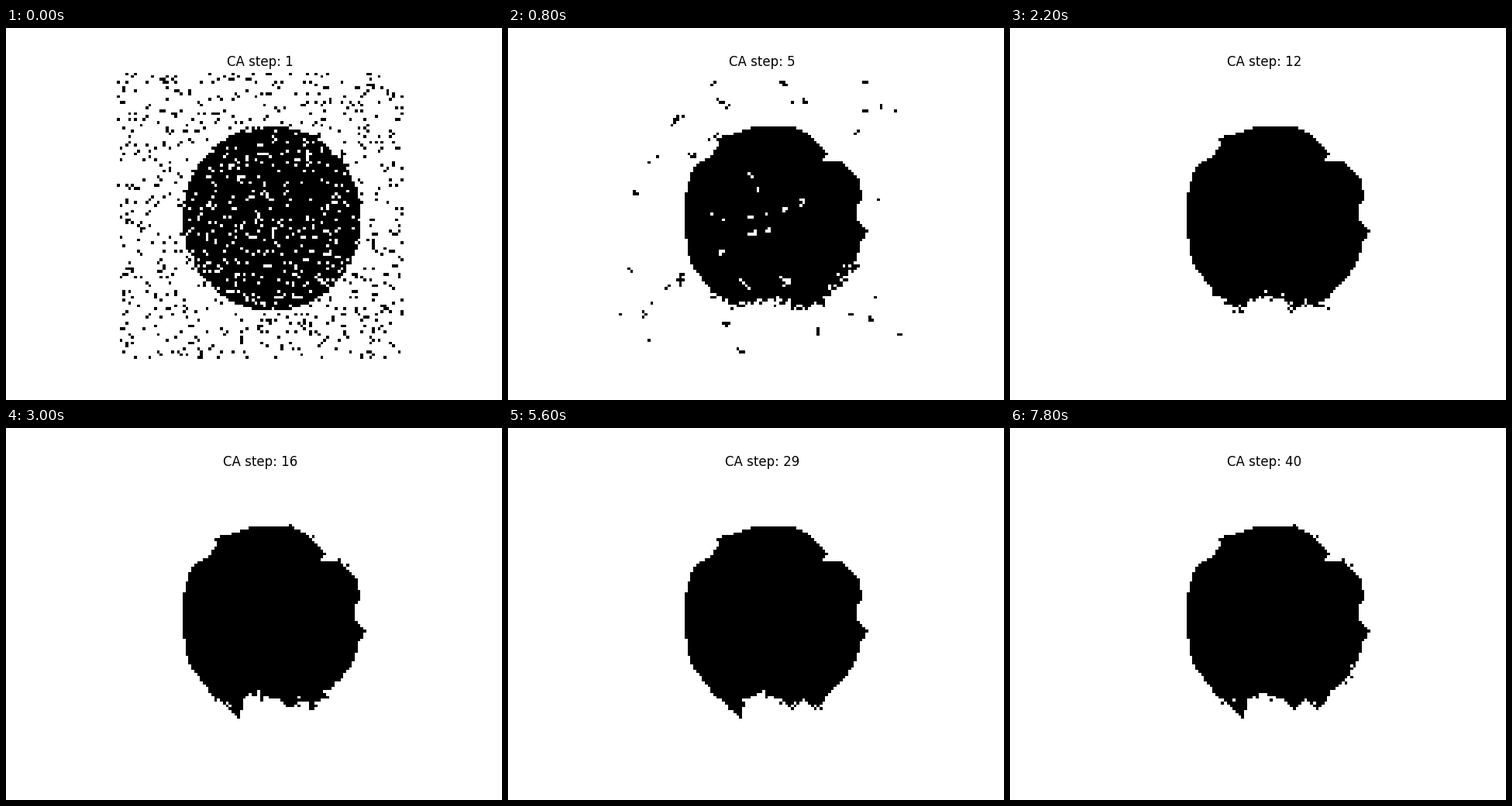
Animation, 640 px wide and 480 px high, one loop 8000 ms. Source, as a matplotlib script:

```python
import numpy as np
import matplotlib.pyplot as plt
from matplotlib.animation import FuncAnimation
from matplotlib.path import Path

SIZE, STEPS = 100, 40
row, col = np.mgrid[:SIZE, :SIZE]

# Corners of the settled blob as (column, row); its lower side is cut separately.
OUTLINE = [(47, 19), (61, 19), (66, 21.5), (73, 28), (71, 31), (78, 31), (84, 38),
           (85, 44), (82.5, 47), (83.5, 52), (87, 55.5), (84, 60), (83, 65),
           (80, 70), (73, 77), (70, 82), (70, 90), (42, 90), (42, 86), (38, 82),
           (32, 76), (26, 68), (24, 63), (23, 53), (22.5, 46), (25, 36), (28, 31),
           (32, 30), (35, 25), (34, 23), (40, 21.5)]

# Rows of the lower side at a few columns, before and after it wears into teeth.
KNOTS = [32, 38, 42, 44, 49, 56, 60, 64, 68, 70, 73]
SMOOTH = [77, 80, 81, 81, 80, 79, 82, 82, 81, 81, 77]
TEETH = [77, 82, 86, 79, 77, 79, 83, 79, 83, 81, 77]

BLINKERS = ([30, 32, 18, 22], [77, 80, 60, 68])


def box_mean(mask, reach):
    span = range(-reach, reach + 1)
    return np.mean([np.roll(mask, (dy, dx), (0, 1)) for dy in span for dx in span],
                   axis=0)


def radius(x, y):
    return np.hypot((x - 53.5) / 31.2, (y - 50.5) / 32.25)


def make_clumps(count, inner, outer, rng):
    """Small random walks inside a ring, each with the step it dies at."""
    clumps = []
    while len(clumps) < count:
        spot = rng.integers(0, SIZE, 2)
        if inner < radius(*spot) < outer:
            moves = rng.integers(-1, 2, (rng.integers(0, 4), 2))
            cells = np.vstack([spot, spot + np.cumsum(moves, axis=0)])
            clumps.append((np.clip(cells, 0, SIZE - 1), 5 + 7 * rng.random() ** 8))
    return clumps


def stamp(clumps, n):
    mask = np.zeros((SIZE, SIZE), bool)
    for cells, death in clumps:
        if n <= death:
            mask[cells[:, 1], cells[:, 0]] = True
    return mask


rng = np.random.default_rng(11)
disc = radius(col, row) < 1
noise = rng.random((SIZE, SIZE)) < np.where(disc, 0.11, 0.085)
strength = 9 * box_mean(noise, 1) - 1 + rng.random((SIZE, SIZE))
switch = rng.random((SIZE, SIZE))
specks = make_clumps(38, 1.1, 9, rng)
holes = make_clumps(16, 0, 0.8, rng)

centres = np.column_stack([col.ravel() + 0.5, row.ravel() + 0.5])
outline = Path(OUTLINE).contains_points(centres).reshape(SIZE, SIZE)
fringe = (row > 66) & (row + col > 108)


def state(n):
    wear = 1 - (1 - np.clip((n - 5) / 16, 0, 1)) ** 2
    lower = np.interp(col, KNOTS, SMOOTH) * (1 - wear)
    lower += np.interp(col, KNOTS, TEETH) * wear
    settled = outline & (row + 0.5 < lower)
    body = np.where(switch < (n - 1) / 4, settled, disc)

    # Loose cells along the lower side, fewer as the shape settles.
    share = box_mean(body, 2)
    rate = np.interp(n, [1, 5, 12, 21], [0, 0.32, 0.16, 0.06])
    chance = rate * (4 * share * (1 - share)) ** 1.5
    loose = np.random.default_rng(100 + n).random((SIZE, SIZE)) < chance
    cells = body ^ (loose & fringe)

    if n < 5:
        cells ^= noise & (strength > 0.9 * (n - 1))
    if n > 1:
        cells |= stamp(specks, n)
        cells &= ~stamp(holes, n)
    if n > 12 and n % 2 == 0:
        cells[BLINKERS] = True
    return cells


states = [state(n) for n in range(1, STEPS + 1)]

fig, ax = plt.subplots(figsize=(6.4, 4.8), dpi=100)
ax.axis("off")
image = ax.imshow(states[0], cmap="binary", vmin=0, vmax=1, interpolation="nearest")
title = ax.set_title("CA step: 1")


def draw(i):
    image.set_data(states[i])
    title.set_text(f"CA step: {i + 1}")
    return image, title


anim = FuncAnimation(fig, draw, frames=STEPS, interval=200, repeat=True,
                     repeat_delay=0, blit=False)
plt.show()
```
